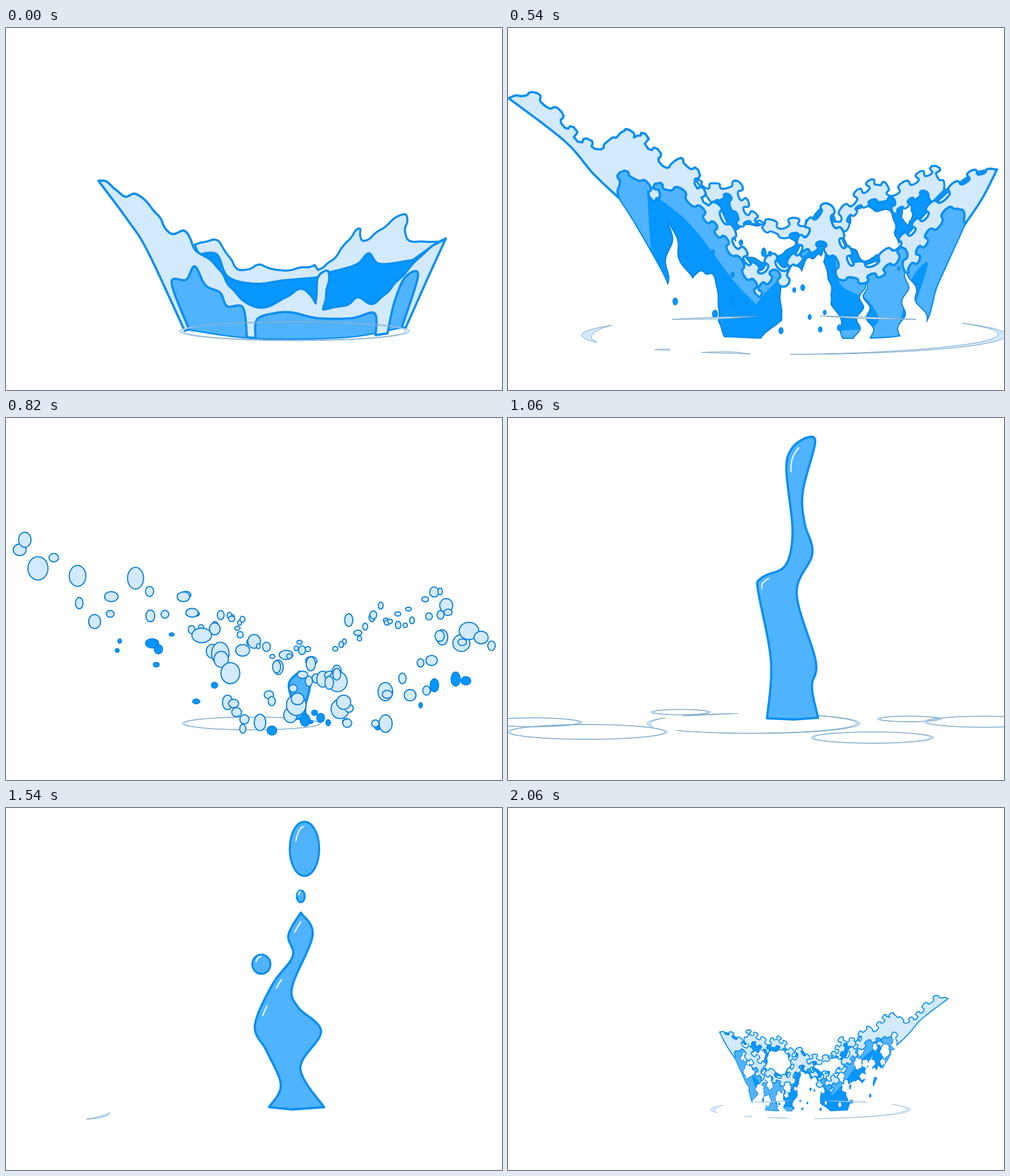
Write an HTML page with a canvas that moves like this. It is 875 by 640 pixels and loops after 2100 ms.

```html
<!DOCTYPE html>
<html lang="en">
<head>
<meta charset="utf-8">
<title>Water splash</title>
<style>
html, body { margin: 0; width: 100%; height: 100%; overflow: hidden; background: #fff; }
canvas { display: block; }
</style>
</head>
<body>
<canvas id="c" width="875" height="640"></canvas>
<script>
const ctx = document.getElementById('c').getContext('2d');
const LOOP = 2100, LIGHT = '#d3e9fc', MID = '#50b3ff', DARK = '#0896ff', EDGE = '#0a8ff0', THIN = '#0b80d8', RING = '#6d9fc4';
const clamp = (v, a = 0, b = 1) => Math.min(b, Math.max(a, v));
const lerp = (a, b, k) => a + (b - a) * k;
const ramp = (t, a, b) => clamp((t - a) / (b - a));
const easeOut = (p, n = 1.5) => 1 - Math.pow(1 - clamp(p), n);
const mix = (a, b, k) => a.map((p, i) => [lerp(p[0], b[i][0], k), lerp(p[1], b[i][1], k)]);

function random(seed) {
  return () => (seed = (seed * 16807) % 2147483647) / 2147483647;
}

// Spline through a few points, resampled evenly along its length.
function curve(str, closed, n = 110) {
  const v = str.split(' ').map(Number), p = [], d = [], len = [0], out = [];
  for (let i = 0; i < v.length; i += 2) p.push([v[i], v[i + 1]]);
  if (closed) p.push(p[0]);
  for (let i = 0; i < p.length - 1; i++) {
    const a = p[i - 1] || p[i], b = p[i], c = p[i + 1], e = p[i + 2] || c;
    for (let u = 0; u < 1; u += .125) {
      d.push([0, 1].map(m => b[m] + u * ((c[m] - a[m]) / 2 +
        u * (a[m] - 2.5 * b[m] + 2 * c[m] - e[m] / 2 + u * (1.5 * (b[m] - c[m]) + (e[m] - a[m]) / 2)))));
    }
  }
  d.push(p[p.length - 1]);
  for (let i = 1; i < d.length; i++) len.push(len[i - 1] + Math.hypot(d[i][0] - d[i - 1][0], d[i][1] - d[i - 1][1]));
  for (let i = 0, j = 1; i < n; i++) {
    const s = len[len.length - 1] * i / (n - 1);
    while (j < d.length - 1 && len[j] < s) j++;
    out.push(mix([d[j - 1]], [d[j]], (s - len[j - 1]) / (len[j] - len[j - 1] || 1))[0]);
  }
  return out;
}

// Turns an edge into rounded knobs; the ends stay where they are.
function scallop(pts, amp, wave) {
  let s = 0;
  return pts.map(([x, y], i) => {
    const a = pts[Math.max(0, i - 3)], b = pts[Math.min(pts.length - 1, i + 3)];
    const dx = b[0] - a[0], dy = b[1] - a[1], d = Math.hypot(dx, dy) || 1;
    if (i) s += Math.hypot(x - pts[i - 1][0], y - pts[i - 1][1]);
    const q = s / wave * Math.PI * 2 + Math.sin(s / wave * 1.7);
    const e = amp * Math.min(1, i / 12, (pts.length - 1 - i) / 12);
    const n = e * Math.sin(q), t = -e * .6 * Math.sin(2 * q);
    return [x + (dy * n + dx * t) / d, y + (dy * t - dx * n) / d];
  });
}

function trace(pts, close = true) {
  ctx.beginPath();
  pts.forEach(p => ctx.lineTo(p[0], p[1]));
  if (close) ctx.closePath();
}
function paint(fill, stroke, width) {
  if (fill) { ctx.fillStyle = fill; ctx.fill(); }
  if (stroke) { ctx.strokeStyle = stroke; ctx.lineWidth = width; ctx.stroke(); }
}
function shape(pts, ...style) {
  trace(pts);
  paint(...style);
}
function blob(x, y, rx, ry, ...style) {
  ctx.beginPath();
  ctx.ellipse(x, y, rx, ry, 0, 0, Math.PI * 2);
  paint(...style);
}

// Edges of the crown: low pose, tall pose.
const pose = (...s) => s.map(v => curve(v));
const parts = {
  front: [
    pose('163 270 180 273 208 298 230 293 265 327 290 364 315 358 332 389 345 400',
      '1 137 38 130 75 150 125 207 165 222 183 216 197 191 222 206 232 198 283 254 308 242 328 258 345 305 378 330'),
    pose('345 400 373 422 400 463 440 494 478 485 523 461 546 487', '378 330 405 385 442 430 466 406 488 424 510 395 518 372'),
    pose('546 487 551 441 570 432 560 497', '518 372 545 325 565 323 583 370 605 422'),
    pose('560 497 600 490 620 476 650 486 700 437 740 395 776 372', '605 422 640 415 690 375 740 320 800 272 843 263')
  ],
  right: [pose('776 372 745 440 705 530', '843 263 818 315 790 358')],
  left: [pose('315 535 250 395 215 340 163 270', '195 313 150 270 100 213 1 137')],
  low: [
    pose('323 533 292 450 318 445 333 421 352 455 378 468 390 492 418 494 425 547', '195 313 197 275 230 276 266 321 262 291 312 304 383 382 443 470'),
    pose('440 548 443 515 475 504 505 503 550 513 610 513 650 504 652 543', '443 470 468 434 487 452 510 413 535 392 553 385 570 410 582 440'),
    pose('673 540 685 485 704 441 727 437 698 530', '582 440 612 449 660 430 685 398 697 435 725 380 775 325 790 358')
  ],
  base: [pose('698 530 600 547 440 549 323 534', '790 358 745 455 708 536 565 549 395 546 315 535 275 440 195 313')],
  backTop: [
    pose('333 383 372 376 395 408 415 429 449 419 482 429 545 420', '330 275 362 288 403 282 428 333 475 350 500 343 530 345'),
    pose('550 428 577 409 622 355 632 377 703 328 707 373 762 378', '578 340 610 300 645 276 668 297 738 260 755 297')
  ],
  backLow: [
    pose('340 400 372 400 392 440 440 452 490 446 548 441', '360 318 388 303 408 350 440 346 470 368 518 365'),
    pose('570 432 618 418 640 398 660 417 718 410', '585 372 610 325 664 308 676 332 718 300 735 318')
  ]
};
const shades = ['275 340 325 380 375 445 428 515 315 524 285 450', '468 512 475 480 530 425 562 400 570 458 605 480 605 512', '698 510 712 455 732 435 710 500']
  .map(s => curve(s, true));
// x, y and final radii
const backHoles = [[447, 378, 52, 32], [640, 362, 46, 44], [704, 328, 8, 17]];
const frontHoles = [[345, 488, 22, 48], [505, 482, 20, 50], [541, 472, 22, 58]];
// Top of the gap, then its foot from left to right
const tears = [[288, 345, 262, 395], [553, 385, 440, 598], [628, 445, 612, 645], [706, 418, 688, 760]];

function part(name, p) {
  const k = easeOut(p / 300), m = ramp(p, 300, 540);
  return parts[name].map(s => mix(s[0], s[1], k).map(([x, y]) => [
    x + Math.max(0, x - 515) * .06 * m,
    y - 13 * m * clamp(Math.abs(x - 515) / 300) * clamp((500 - y) / 150)
  ]));
}
const joined = (name, p) => part(name, p).flat();

function resize(pts, s) {
  const mid = [0, 1].map(m => pts.reduce((sum, q) => sum + q[m], 0) / pts.length);
  return pts.map(q => [lerp(mid[0], q[0], s), lerp(mid[1], q[1], s)]);
}

// Cuts a shape out of what is drawn so far and lines its rim.
function cut(pts) {
  ctx.globalCompositeOperation = 'source-atop';
  shape(pts, null, THIN, 4);
  ctx.globalCompositeOperation = 'destination-out';
  shape(pts, '#000');
  ctx.globalCompositeOperation = 'source-over';
}
function cutBlob(x, y, rx, ry, rough) {
  const pts = [];
  for (let a = 0; a < 6.28; a += .12) {
    const r = 1 + rough * (Math.sin(a * 5 + x) + .6 * Math.sin(a * 9 + y));
    pts.push([x + rx * r * Math.cos(a), y + ry * r * Math.sin(a)]);
  }
  cut(pts);
}
function cutTear([x, top, l, r], g) {
  const y0 = lerp(552, top, g), pts = [];
  for (let u = -1; u <= 1.001; u += .04) {
    const v = Math.abs(u), d = u < 0 ? l - x : r - x;
    const edge = Math.sin(v * 19 + x) * 5 * g;
    pts.push([x + d * v * Math.sqrt(v) + edge, lerp(y0, 560, Math.pow(v, lerp(2.6, 1, g)))]);
  }
  cut(pts);
}

function crown(p) {
  const m = ramp(p, 300, 540), late = ramp(p, 540, 600), amp = 6 * m + 2 * late;
  const top = scallop(joined('backTop', p), 1 + amp, 34), backLow = scallop(joined('backLow', p), amp * .7, 30);
  const front = joined('front', p), low = scallop(joined('low', p), amp, 40), body = low.concat(joined('base', p));
  const grow = lerp(.28, 1, m) * ramp(p, 150, 300);

  shape(top.concat(part('front', p).slice(1).flat().reverse()), DARK, EDGE, 3.5);
  if (grow) backHoles.forEach(([x, y, rx, ry]) => cutBlob(x, y, rx * grow, ry * grow, .1));
  shape(top.concat(backLow.reverse()), LIGHT, EDGE, 3.5);

  shape(body, MID);
  ctx.save();
  trace(body);
  ctx.clip();
  shades.forEach(s => shape(resize(s, ramp(p, 100, 300) + .5 * m), DARK));
  ctx.restore();
  shape(body, null, EDGE, 2.5);
  if (p > 150) {
    const open = lerp(.08, 1, m) * ramp(p, 200, 300) + .1 * late;
    frontHoles.forEach(([x, y, rx, ry]) => cutBlob(x, y, rx * (.2 + grow), ry * (.2 + grow), .06));
    tears.forEach((t, i) => { if (open && (i < 2 || m)) cutTear(t, open); });
  }
  if (late) erode(late);
  shape(scallop(front, .8 + amp, 42).concat(joined('right', p), low.reverse(), joined('left', p)), LIGHT, EDGE, 4);
  drips(p);
}

function erode(k) {
  const rnd = random(77);
  for (let i = 0; i < 70; i++) {
    const x = 190 + rnd() * 590, d = (x - 520) / 330;
    const y = 545 - d * d * 130 - rnd() * 190, r = (4 + rnd() * 12) * k;
    cutBlob(x, y, r, r * (1 + rnd()), .12);
  }
}

function drips(p) {
  const rnd = random(5), size = ramp(p, 420, 540);
  for (let i = 0; i < 22; i++) {
    const x = 295 + rnd() * 430, y = 365 + rnd() * 180 + (p - 540) * .12, r = (2 + rnd() * 3) * size;
    if (size) blob(x, y, r, r * 1.5, DARK, THIN, 1);
  }
}

// Ripple made of crescents (angles in degrees); without arcs it is whole.
function ripple(x, y, rx, ry, w, arcs) {
  const h = w * ry / rx * 1.7;
  if (!arcs) {
    ctx.beginPath();
    ctx.ellipse(x, y, rx, ry, 0, 0, Math.PI * 2);
    ctx.moveTo(x + rx - w, y);
    ctx.ellipse(x, y, rx - w, ry - h, 0, 0, Math.PI * 2);
    ctx.fillStyle = LIGHT;
    ctx.fill('evenodd');
    return paint(null, RING, .8);
  }
  for (const [a, b] of arcs) {
    const outer = [], inner = [];
    for (let u = 0; u <= 1.001; u += .025) {
      const t = lerp(a, b, u) * Math.PI / 180, s = Math.sin(u * Math.PI);
      outer.push([x + rx * Math.cos(t), y + ry * Math.sin(t)]);
      inner.unshift([x + (rx - w * s) * Math.cos(t), y + (ry - h * s) * Math.sin(t)]);
    }
    shape(outer.concat(inner), LIGHT, RING, 1);
  }
}
const shrink = (arcs, s) => arcs.map(([a, b]) => [(a + b) / 2 - (b - a) / 2 * s, (a + b) / 2 + (b - a) / 2 * s]);
const crownArcs = [[158, 211], [-38, 91], [126, 131], [102, 116], [235, 260], [277, 305]];

function crownRing(p) {
  const k = easeOut(p / 300), m = (p - 300) / 240;
  const s = p < 540 ? lerp(1.6, 1, (p - 400) / 140) : 1 - (p - 540) / 200;
  if (s <= 0) return;
  if (p <= 300) ripple(509, lerp(536, 540, k), lerp(203, 321, k), lerp(17, 30, k), lerp(7, 13, k));
  else ripple(lerp(509, 505, m), lerp(540, 543, m), lerp(321, 375, m), lerp(30, 34, m), lerp(13, 19, m), p > 400 && shrink(crownArcs, s));
}

// x, y, radius at the age of 150 ms, time of birth
const ripples = [[433, 540, 141, 720], [305, 520, 53, 910], [45, 538, 86, 910], [140, 555, 141, 910],
  [643, 565, 108, 910], [708, 532, 56, 910], [840, 537, 106, 910], [110, 540, 49, 1080]];

function drawRipples(t) {
  for (const [x, y, r, birth] of ripples) {
    const age = t - birth, u = age / 520;
    if (age <= 0 || u >= 1) continue;
    const rx = r * Math.pow(age / 150, .35), s = Math.min(1, (1 - u) * 2.8);
    const arcs = shrink([[-85, 140], [160, 215], [228, 262]], s).slice(0, s > .4 ? 3 : 1);
    ripple(x, y, rx, rx * (r < 50 ? .16 : .095), 2.5 + u * 6, u > .55 && arcs);
  }
}

// The crown's edges break into drops, spread along each edge.
const rnd = random(23);
function breakUp(name, count, dy, spread, size) {
  const edge = joined(name, 600);
  return Array.from({ length: count }, (_, i) => {
    const [x, y] = edge[Math.floor((i + rnd()) / count * (edge.length - 1))];
    const r = size * (.4 + .8 * rnd() ** 2.2), flat = .8 + rnd() * .45;
    return [x + (rnd() - .5) * 24, y + dy + (rnd() - .5) * spread, r / flat, r * flat];
  });
}
const darkDrops = breakUp('low', 34, 25, 90, 9);
const lightDrops = breakUp('backTop', 52, -35, 45, 10).concat(breakUp('front', 72, 8, 75, 16));

function drops(t) {
  const fall = .0016 * (t - 560) ** 2, size = 1 + .5 * (1 - ramp(t, 660, 820)), merged = t < 780;
  const each = (list, ...style) => list.forEach(([x, y, rx, ry], i) => {
    if (y + fall < 540 + i * 7 % 20) blob(x, y + fall, rx * size, ry * size, ...style);
  });
  each(darkDrops, DARK, THIN, 1.5);
  if (merged) {
    each(lightDrops, null, EDGE, 4);
    each(lightDrops, LIGHT);
  } else each(lightDrops, LIGHT, THIN, 2);
}

// Column of water: time, left side going up, right side going down.
const column = [
  [780, '503 530 510 528 518 527', '518 527 526 528 530 530'],
  [820, '503 530 507 510 499 470 518 448', '518 448 536 470 528 510 530 530'],
  [1060, '457 531 464 430 441 305 443 287 455 278 490 260 502 200 491 90 502 52 525 35', '525 35 542 42 520 130 523 185 537 240 509 310 543 430 536 475 547 530'],
  [1360, '463 530 440 370 460 310 440 280 458 262 495 262 515 125 500 80 520 8', '520 8 542 10 548 70 525 125 540 220 508 320 552 400 522 470 552 530']
].map(([t, l, r]) => [t, curve(l), curve(r)]);
const stemL = curve('464 529 485 490 460 430 439 385 470 312 506 262 498 225 520 185');
const stemR = curve('520 185 541 225 505 315 515 352 556 395 519 460 561 529');

function shine(pts) {
  ctx.lineCap = 'round';
  trace(pts, false);
  paint(null, '#e2f2ff', 2.5);
}

function drawColumn(t) {
  let left, right, marks;
  if (t < 1360) {
    const i = t < 820 ? 0 : t < 1060 ? 1 : 2, a = column[i], b = column[i + 1];
    const k = easeOut((t - a[0]) / (b[0] - a[0]));
    left = mix(a[1], b[1], k);
    right = mix(a[2], b[2], k);
    marks = t < 820 ? [] : [[.43, .48], [.86, .95]];
  } else {
    const h = t < 1540 ? lerp(1.16, 1, ramp(t, 1360, 1540)) : 1 - ramp(t, 1540, 1770) ** 1.4;
    const sink = ([x, y]) => [x, 530 - (530 - y) * h];
    left = stemL.map(sink);
    right = stemR.map(sink);
    marks = t < 1660 ? [[.47, .53], [.61, .66], [.9, .96]] : [];
  }
  shape(left.concat(right, [[505, 533]]), MID, EDGE, 4);
  marks.forEach(m => shine(left.slice(...m.map(u => Math.round(u * left.length))).map(([x, y]) => [x + 8, y + 4])));
}

function lateDrops(t) {
  const fall = .0035 * Math.max(0, t - 1464) ** 2;
  for (const [x, y, rx, ry] of [[526.5, 52, 26, 48], [520, 136, 7, 10.5], [450.5, 256, 16, 17]]) {
    const cy = y + fall, arc = [];
    if (cy + ry > 545) continue;
    blob(x, cy, rx, ry, MID, EDGE, 3.5);
    for (let a = 3.5; a < 4.6; a += .1) arc.push([x + rx * .62 * Math.cos(a), cy + ry * .82 * Math.sin(a)]);
    shine(arc);
  }
}

// Second, smaller crown: mirrored, its ring is not.
function smallCrown(p) {
  ctx.save();
  ctx.transform(-.468, 0, 0, .468, 777, 279);
  crown(p);
  ctx.restore();
  ctx.save();
  ctx.transform(.468, 0, 0, .468, 297, 279);
  crownRing(Math.min(p, 550));
  ctx.restore();
}

function draw(t) {
  ctx.clearRect(0, 0, 875, 640);
  ctx.lineJoin = 'round';
  if (t <= 600) crown(t);
  if (t < 740) crownRing(t);
  else drawRipples(t);
  if (t >= 780 && t < 1770) drawColumn(t);
  if (t >= 660 && t < 1060) drops(t);
  if (t >= 1360) lateDrops(t);
  if (t >= 1740) smallCrown((t - 1740) / 320 * 600);
}

const start = performance.now();
function tick(now) {
  const t = Math.max(0, now - start) % LOOP;
  draw(t < 660 ? Math.floor(t / 60) * 60 : 660 + Math.floor((t - 660) / 40) * 40);
  requestAnimationFrame(tick);
}
draw(0);
requestAnimationFrame(tick);
</script>
</body>
</html>
```
